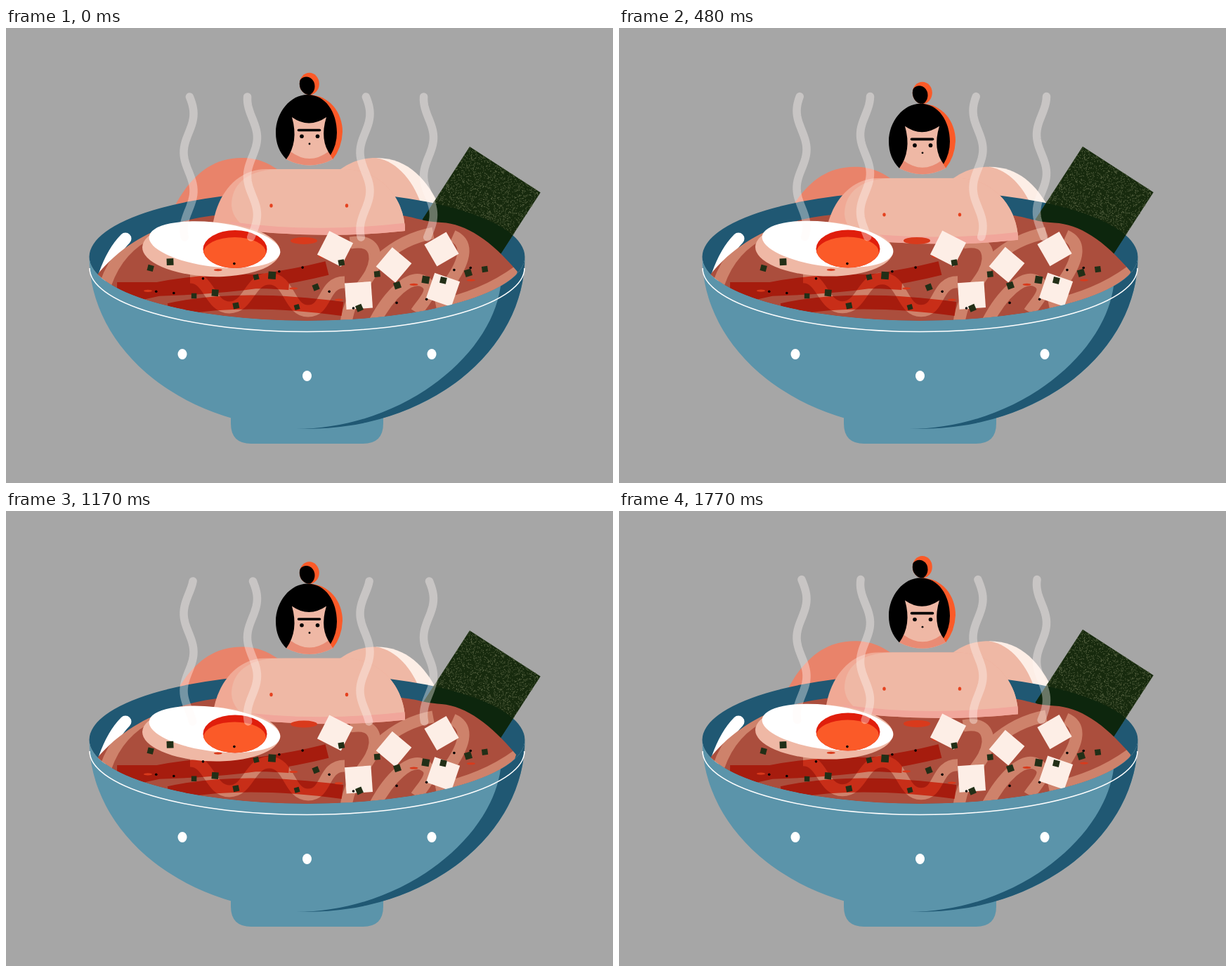
Recreate the animation shown at these times as an HTML page. Size 864x648 px, loop 1800 ms.

```html
<!DOCTYPE html>
<html lang="en">
<head>
<meta charset="utf-8">
<title>Ramen bath</title>
<style>
html, body { margin: 0; width: 100%; height: 100%; overflow: hidden; background: #a6a6a6; }
svg { display: block; }
#noodles { fill: none; stroke: #ce826b; stroke-width: 17; }
#strips { fill: none; stroke: #f85938; stroke-width: 20; mix-blend-mode: multiply; }
#steam { fill: none; stroke: #fff8f4; stroke-opacity: .38; stroke-width: 11.5; stroke-linecap: round; }
</style>
</head>
<body>
<svg width="864" height="648" viewBox="0 0 864 648">
  <defs>
    <path id="mouth" d="M118.5 326A310 94 0 0 1 738.5 326A310 91 0 0 1 118.5 326Z"/>
    <clipPath id="rim"><use href="#mouth"/></clipPath>
    <clipPath id="broth" clip-path="url(#rim)"><path id="soup"/></clipPath>
    <clipPath id="yolk"><ellipse cx="326" cy="315" rx="45.5" ry="27"/></clipPath>
    <clipPath id="bun"><ellipse cx="431.8" cy="79.5" rx="14" ry="15.7"/></clipPath>
    <clipPath id="chest"><path d="M370 201H480C540 201 568 250 568 289Q440 303 294 283C300 235 330 201 370 201"/></clipPath>
    <rect id="sheet" width="120" height="124" transform="translate(660 169) rotate(32.9)"/>
  </defs>

  <g class="body">
    <path fill="#e9836a" d="M236 262C255 222 285 185 335 185C360 185 375 193 390 204V270Z"/>
    <path fill="#fdeee6" d="M621 262C603 222 577 185 527 185L500 262Z"/>
    <path fill="#efb8a5" d="M472 204C487 193 502 185 527 185C560 190 585 225 594 262H472Z"/>
  </g>

  <use href="#mouth" fill="#205873"/>
  <path fill="none" stroke="#fff" stroke-width="17" stroke-linecap="round" d="M140 352Q152 318 170 300"/>

  <g class="nori">
    <use href="#sheet" fill="#172a0e"/>
    <path id="specks" stroke="#566241"/>
  </g>
  <g clip-path="url(#rim)"><use class="nori" href="#sheet" fill="#0d260d"/></g>

  <g clip-path="url(#broth)">
    <rect x="110" y="230" width="640" height="200" fill="#ab4e3d"/>
    <path id="noodles" d="M142 364Q160 312 208 290
      M262 355C290 355 290 398 318 398S346 357 375 357S402 403 430 403S450 362 482 362
      M484 420C490 372 522 362 525 330Q526 300 490 306
      M532 330Q565 300 608 292
      M636 296Q668 310 632 362
      M525 418C545 380 575 350 595 361S592 392 584 405
      M612 396Q680 382 728 347"/>
    <path id="strips" d="M158 372Q330 374 457 342M175 382Q270 354 403 363M232 402Q330 380 479 400"/>
  </g>

  <g class="body">
    <g clip-path="url(#chest)">
      <rect x="290" y="195" width="285" height="115" fill="#f0a995"/>
      <path fill="#efb8a5" d="M385 201C340 203 321 225 321 252Q322 274 348 288H575V195Z"/>
      <path fill="#f1a69b" d="M575 277Q440 293 320 276V310H575Z"/>
    </g>
    <g fill="#e5421f">
      <ellipse cx="377.5" cy="253" rx="2.2" ry="2.7"/>
      <ellipse cx="485" cy="253" rx="2.2" ry="2.7"/>
    </g>
  </g>

  <g id="head">
    <g clip-path="url(#bun)">
      <rect x="415" y="62" width="34" height="36" fill="#fb5a28"/>
      <ellipse cx="427.5" cy="83" rx="12" ry="13.5"/>
    </g>
    <path fill="#fb5a28" d="M430 95C460 95 479 120 479 148Q478 171 465 187L440 150Z"/>
    <path fill="#efb8a5" d="M399 125H459V178L465 187Q432 204 399 187Z"/>
    <path fill="#e98b74" d="M399 187L405 176Q432 196 459 176L465 187Q432 204 399 187Z"/>
    <path d="M429 95C405 95 384 120 384 149Q384 172 399 187Q417 162 407 127Q431 144 456 127Q446 160 462 181Q471 166 471 149C471 120 455 95 429 95Z"/>
    <path id="brow" stroke="#000" stroke-width="3.6" stroke-linecap="round" d="M416.5 145.5H446.5"/>
    <ellipse class="eye" cx="421" cy="154.3" rx="2.8"/>
    <ellipse class="eye" cx="443.5" cy="154.3" rx="2.8"/>
    <circle cx="432" cy="165" r="1.4"/>
  </g>

  <g id="egg">
    <ellipse cx="292" cy="315.3" rx="98" ry="38.7" transform="rotate(2 292 315)" fill="#efb8a5"/>
    <ellipse cx="297" cy="308.5" rx="94" ry="31.5" transform="rotate(7 297 308.5)" fill="#fff"/>
    <g clip-path="url(#yolk)">
      <rect x="280" y="287" width="92" height="56" fill="#e01e0c"/>
      <ellipse cx="325.5" cy="320" rx="44.5" ry="22" fill="#fb5a28"/>
    </g>
  </g>

  <g id="flakes" fill="#d93a1c">
    <ellipse cx="424" cy="303" rx="19" ry="5"/>
    <ellipse cx="456" cy="325" rx="11" ry="3"/>
  </g>
  <g id="tofu" fill="#fdeee6"></g>
  <g id="herbs" fill="#222f17"></g>
  <g id="pepper"></g>

  <path fill="#5b94aa" d="M118.5 326A310 91 0 0 0 738.5 326A310 245 0 0 1 118.5 326ZM320 540H537V563Q537 592 508 592H349Q320 592 320 563Z"/>
  <path fill="#205873" d="M413 571C560 571 690 470 704 367.7A310 91 0 0 0 738.5 326A310 245 0 0 1 428 571Z"/>
  <path fill="none" stroke="#fff" stroke-width="1.5" d="M119 342A309.5 90.5 0 0 0 738 342"/>
  <g fill="#fff">
    <ellipse cx="251" cy="464.5" rx="6.5" ry="7.5"/>
    <ellipse cx="428.5" cy="495.5" rx="6.5" ry="7.5"/>
    <ellipse cx="606" cy="464.5" rx="6.5" ry="7.5"/>
  </g>
  <path id="steam"/>
</svg>

<script>
const $ = id => document.getElementById(id);
const all = q => document.querySelectorAll(q);
const move = (el, y, x = 0) => el.setAttribute('transform', `translate(${x} ${y})`);
const square = (x, y, size, turn) =>
  `<rect x="${-size / 2}" y="${-size / 2}" width="${size}" height="${size}" transform="translate(${x} ${y}) rotate(${turn})"/>`;

let seed = 7;
const random = (lo = 0, hi = 1) => lo + (hi - lo) * (seed = seed * 16807 % 2147483647) / 2147483647;

// Spread pieces evenly across the broth, at random depths in front of the bather.
function scatter(id, count, piece) {
  for (let i = 0; i < count; i++) {
    const x = 185 + 510 * (i + random(.2, .8)) / count;
    const front = 316 + 91 * Math.sqrt(1 - ((x - 428.5) / 310) ** 2);
    $(id).innerHTML += piece(x, random(330, front));
  }
}

scatter('flakes', 6, (x, y) => `<ellipse cx="${x}" cy="${y}" rx="6" ry="1.6"/>`);
scatter('herbs', 17, (x, y) => square(x, y, random(7, 11), random(-35, 35)));
scatter('pepper', 12, (x, y) => `<circle cx="${x}" cy="${y}" r="1.8"/>`);

$('tofu').innerHTML =
  square(468.5, 314.5, 38, 27) + square(552, 337.5, 36, 40) + square(620, 315, 36, 60) +
  square(622, 373, 38, 19) + square(502, 381, 37.5, -4);

let specks = '';
for (let i = 0; i < 2200; i++) {
  const u = random(), v = random(0, .9);
  specks += `M${660 + 101 * u - 68 * v} ${169.5 + 65 * u + 103 * v}h1`;
}
$('specks').setAttribute('d', specks);

const LOOP = 1800, STEP = 30, WAVE = 110;

function wisp(x, crest, lift) {
  let d = '';
  for (let y = 98; y <= 300; y += 4) {
    const dx = 7 * Math.cos((y - crest) / WAVE * 2 * Math.PI);
    d += `${d ? 'L' : 'M'}${x + dx} ${y + lift}`;
  }
  return d;
}

function draw() {
  const t = Math.floor(performance.now() % LOOP / STEP) * STEP;
  const angle = t / 900 * 2 * Math.PI;
  const sway = Math.sin(angle);
  const sink = 6.5 * (1 - Math.cos(angle));

  all('.body').forEach(el => move(el, sink));
  move($('head'), sink);

  const blink = Math.max(0, Math.min(1, (75 - Math.abs(t - 150)) / 45));
  move($('brow'), 5 * blink);
  all('.eye').forEach(el => el.setAttribute('ry', 2.8 * (1 - blink)));

  move($('egg'), 2.5 * sway);
  all('.nori').forEach(el => move(el, 1.3 * sway));
  move($('tofu'), 1.6 * sway);
  move($('flakes'), .6 * sway);
  move($('noodles'), sway);
  move($('herbs'), -.3 * sway);

  $('soup').setAttribute('d',
    `M128 354C160 ${312 + 2 * sway} 205 ${290 + 2 * sway} 230 ${282 + 2 * sway}` +
    `S280 ${267 + sway} 320 265H545C585 ${268 - 2 * sway} 585 ${275 - 3 * sway} 620 ${277 - 2 * sway}` +
    `S690 ${302 + 2 * sway} ${728 - 2 * sway} 347L700 430H128Z`);

  const crest = 122 - t / 900 * WAVE;
  $('steam').setAttribute('d', [260, 511].map(x =>
    wisp(x, crest, 2 * sway) + wisp(x + 90.5, crest + 34, 2 * sway)).join(''));
  requestAnimationFrame(draw);
}
draw();
</script>
</body>
</html>
```
